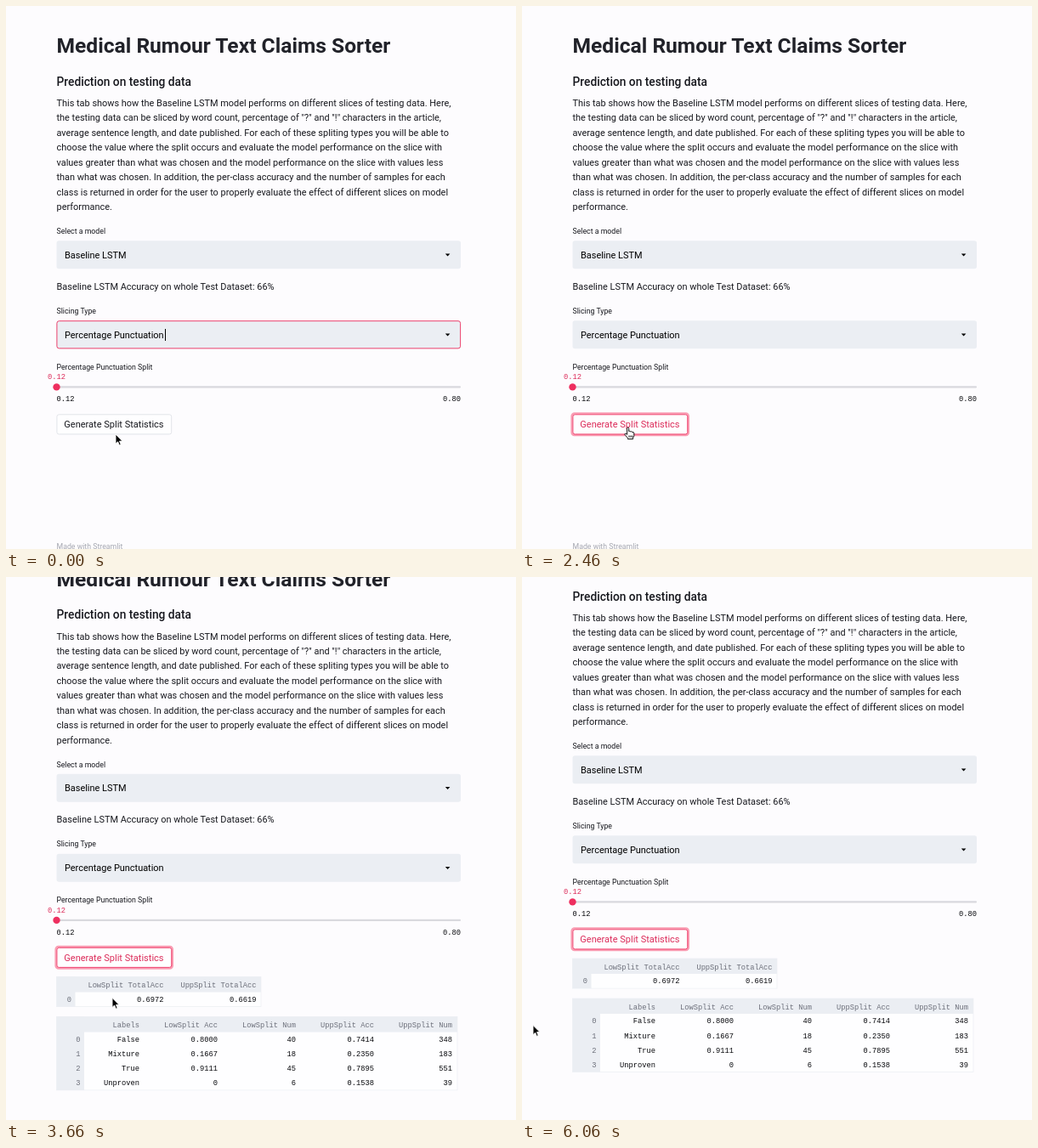
Write an HTML page that moves like this. It is 600 px wide and 639 px high and loops after 6300 ms.

```html
<!DOCTYPE html>
<html lang="en">
<head>
<meta charset="utf-8">
<title>Testing data slices</title>
<style>
  html, body { margin: 0; width: 100%; height: 100%; overflow: hidden; background: #fdfcfe; }
  svg { display: block; width: 600px; height: 639px; }
  text { font: 10.93px Roboto, Arial, sans-serif; fill: #17181e; white-space: pre; }
  .title { font-size: 24.6px; font-weight: 700; fill: #212229; }
  .sub { font-size: 13.75px; font-weight: 500; }
  .small { font-size: 8.75px; }
  .mono { font: 8.74px "Liberation Mono", "Courier New", monospace; fill: #08090d; }
  .dim { fill: #6c6f7a; }
  .foot { fill: #a6a8b1; }
  .red { fill: #dc2c5a; }
  .black { fill: #000; }
  .end { text-anchor: end; }
  .mid { text-anchor: middle; }
</style>
</head>
<body>
<svg viewBox="0 0 600 639">
  <g id="page">
    <g id="main"></g>
    <g id="tables"></g>
    <text id="footer" class="small foot" x="59.5" y="639">Made with Streamlit</text>
  </g>
  <g id="cursor">
    <path id="arrow" d="M0 0V11.2L2.6 8.8 4.4 12.9 6.2 12.1 4.5 8.1H8Z" fill="#000" stroke="#fff" stroke-width=".9"/>
    <path id="hand" d="M-1.4 6.6V2Q-1.3.8-.4.8T.7 2V5.2Q1.9 4.5 2.7 5.6 3.9 4.9 4.7 6.1 6.6 5.6 6.8 7.6V10.5L5.6 12.8V14.3H-.6V13L-4 9.2Q-4.3 7.6-2.8 7.8L-1.4 9ZM1 10.2V12.3M2.9 10.2V12.3M4.7 10.2V12.3"
      fill="#fff" stroke="#111" stroke-width="1" stroke-linejoin="round"/>
  </g>
</svg>
<script>
const LOOP = 6300, STEP = 60, LEFT = 59.5, RED = '#ee2f5f', GREY = '#ebeef3';
const el = id => document.getElementById(id);
const show = (id, on) => el(id).setAttribute('visibility', on ? 'visible' : 'hidden');
const text = (x, y, s, cls = '') => `<text x="${x}" y="${y}" class="${cls}">${s}</text>`;
const rect = (x, y, w, h, fill, more = '') =>
  `<rect x="${x}" y="${y}" width="${w}" height="${h}" fill="${fill}" ${more}/>`;

const intro = [
  'This tab shows how the Baseline LSTM model performs on different slices of testing data. Here,',
  'the testing data can be sliced by word count, percentage of "?" and "!" characters in the article,',
  'average sentence length, and date published. For each of these spliting types you will be able to',
  'choose the value where the split occurs and evaluate the model performance on the slice with',
  'values greater than what was chosen and the model performance on the slice with values less',
  'than what was chosen. In addition, the per-class accuracy and the number of samples for each',
  'class is returned in order for the user to properly evaluate the effect of different slices on model',
  'performance.'
];

const select = (y, value) =>
  rect(LEFT, y, 475.5, 33, GREY, 'rx="2.8"') +
  text(69, y + 20.6, value, 'black') +
  `<path d="M516.8 ${y + 15.3}h5.6l-2.8 3z"/>`;

function table(y, width, indexWidth, rights, head, rows) {
  const rowH = 17.1, h = 18 + rows.length * rowH;
  let out = rect(LEFT, y, width, h, '#fefeff', `stroke="${GREY}" stroke-width=".7"`) +
    rect(LEFT, y, width, 18, GREY) + rect(LEFT, y, indexWidth, h, GREY);
  head.forEach((s, i) => out += text(rights[i], y + 12.5, s, 'mono dim end'));
  rows.forEach((row, r) => {
    const base = y + 29.4 + r * rowH;
    out += text(LEFT + indexWidth - 4.5, base, r, 'mono dim end');
    row.forEach((s, i) => out += text(rights[i], base, s, 'mono end'));
  });
  return out;
}

el('main').innerHTML =
  text(LEFT, 55.3, 'Medical Rumour Text Claims Sorter', 'title') +
  text(LEFT, 93.8, 'Prediction on testing data', 'sub') +
  intro.map((s, i) => text(LEFT, 118 + i * 17.43, s)).join('') +
  text(LEFT, 268, 'Select a model', 'small') +
  select(276.3, 'Baseline LSTM') +
  text(LEFT, 333.5, 'Baseline LSTM Accuracy on whole Test Dataset: 66%') +
  text(LEFT, 361.6, 'Slicing Type', 'small') +
  select(370.3, 'Percentage Punctuation') +
  `<g id="focus">${rect(LEFT + .4, 370.7, 474.7, 32.2, 'none', `rx="2.6" stroke="${RED}" stroke-width=".9"`)}
   ${rect(187, 380, 1, 14, '#000')}</g>` +
  text(LEFT, 427.5, 'Percentage Punctuation Split', 'small') +
  text(LEFT, 439.3, '0.12', 'mono red mid') +
  rect(LEFT, 447.2, 475.5, 2.2, '#d9d9de', 'rx="1"') +
  `<circle cx="${LEFT}" cy="448.4" r="4.2" fill="${RED}"/>` +
  text(LEFT, 465.2, '0.12', 'mono') +
  text(535, 465.2, '0.80', 'mono end') +
  rect(58.5, 479.4, 137.4, 25.8, 'none', 'id="ring" rx="3.2" stroke="#fa9db3" stroke-width="2.2"') +
  rect(LEFT + .4, 480.8, 134.8, 23.1, '#fefeff', 'id="button" rx="2.4" stroke-width=".9"') +
  `<text id="label" x="68.3" y="496.3" style="font-size:11.02px">Generate Split Statistics</text>`;

el('tables').innerHTML =
  table(515, 240.5, 22, [185.5, 294.5], ['LowSplit TotalAcc', 'UppSplit TotalAcc'], [['0.6972', '0.6619']]) +
  table(562, 471.5, 32.5, [157, 249, 341, 433, 525],
    ['Labels', 'LowSplit Acc', 'LowSplit Num', 'UppSplit Acc', 'UppSplit Num'],
    [['False', '0.8000', 40, '0.7414', 348],
     ['Mixture', '0.1667', 18, '0.2350', 183],
     ['True', '0.9111', 45, '0.7895', 551],
     ['Unproven', 0, 6, '0.1538', 39]]);

// Piecewise linear value through [time, value] points
function track(t, points) {
  let [t0, v0] = points[0];
  for (const [t1, v1] of points) {
    if (t <= t1) return t1 > t0 ? v0 + (v1 - v0) * (t - t0) / (t1 - t0) : v1;
    [t0, v0] = [t1, v1];
  }
  return v0;
}

function fade(t) {
  const stale = .33;
  if (t < 1680) return 1 - (1 - stale) * track(t, [[540, 0], [1200, 1]]) ** 2;
  return track(t, [[1680, stale], [1860, 1]]);
}

function draw(now) {
  const t = Math.floor(now % LOOP / STEP) * STEP;
  const scroll = track(t, [[3000, 0], [3180, 9], [3480, 9], [3600, 26], [3660, 44.5], [3720, 57.5], [3780, 66]]);
  const x = track(t, [[0, 129], [240, 125], [3780, 125], [3960, 62], [4140, 17], [4260, 13]]);
  const y = track(t, [[0, 504], [240, 495.3], [3780, 495.3], [3960, 513], [4140, 525], [4260, 527.5]]);
  const hover = t >= 120, clicked = t >= 300, hasTables = t >= 2880;
  const pointing = hover && t < 3180;

  el('page').setAttribute('transform', `translate(0 ${-scroll})`);
  el('main').setAttribute('opacity', fade(t));
  el('cursor').setAttribute('transform', `translate(${x} ${y})`);
  el('button').setAttribute('stroke', hover ? RED : '#dfe1e7');
  el('label').setAttribute('class', hover ? 'red' : '');
  show('focus', !clicked);
  show('ring', clicked);
  show('tables', hasTables);
  show('footer', !hasTables);
  show('hand', pointing);
  show('arrow', !pointing);
}

const start = performance.now();
(function frame() {
  draw(performance.now() - start);
  requestAnimationFrame(frame);
})();
</script>
</body>
</html>
```
